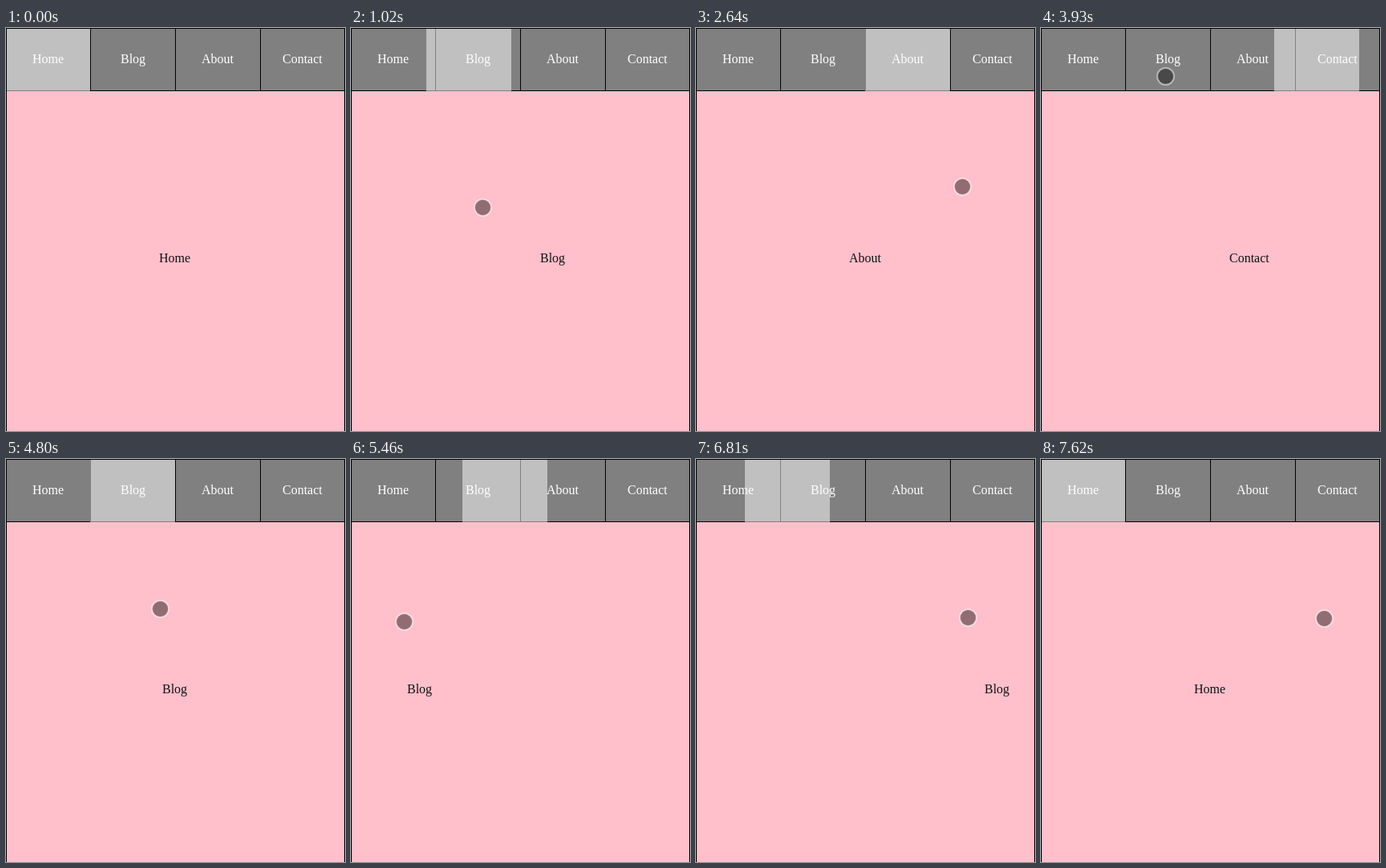
Recreate the animation shown at these times as an HTML page with a canvas. Size 423 px wide and 504 px high, loop 7.65 s.

```html
<!DOCTYPE html>
<html lang="en">
<head>
<meta charset="utf-8">
<title>Swipeable tabs</title>
<style>
  html, body { margin: 0; width: 423px; height: 504px; overflow: hidden; }
  canvas { display: block; }
</style>
</head>
<body>
<canvas id="stage" width="423" height="504"></canvas>
<script>
const ctx = document.getElementById('stage').getContext('2d');
const W = 423, H = 504, LOOP = 7650, STEP = 30;
const TABS = ['Home', 'Blog', 'About', 'Contact'];
const TAB_PITCH = 106, PAGE = 395, SETTLE = 315;

// Moments of the touch story, in ms
const ENTER = 150, SWIPES = [660, 1590, 2640], STROKE = 210, RETURN = 510;
const LEAVE = 3180, TAP = 3893, HOLD = 4800, LET_GO = 5780;
const BACK_START = 6420, BACK_END = 6920;

const DRAGS = [
  ...SWIPES.map((start, i) => ({ start, release: start + STROKE, to: i + 1 })),
  { start: HOLD, release: LET_GO, to: 1 },
  { start: BACK_START, release: BACK_END, to: 0 }
];

const lerp = (a, b, k) => a + (b - a) * k;
const clamp = k => Math.max(0, Math.min(1, k));
const smooth = k => k * k * (3 - 2 * k);
const progress = (t, start, duration) => smooth(clamp((t - start) / duration));
const bezier = (a, b, s) => 3 * a * s * (1 - s) ** 2 + 3 * b * s * s * (1 - s) + s ** 3;

// cubic-bezier(.25, .1, .25, 1)
function ease(x) {
  if (x <= 0 || x >= 1) return clamp(x);
  let lo = 0, hi = 1;
  for (let i = 0; i < 24; i++) {
    const mid = (lo + hi) / 2;
    if (bezier(.25, .25, mid) < x) lo = mid; else hi = mid;
  }
  return bezier(.1, 1, lo);
}

function pointerAt(t) {
  const n = Math.max(0, SWIPES.filter(start => start <= t).length - 1);
  const start = SWIPES[n];
  const away = 1 - progress(t, ENTER, 180);
  const stroke = progress(t, start, STROKE) - progress(t, start + STROKE, RETURN);
  const rise = n + progress(t, start, STROKE + RETURN);
  let x = 332 + 78 * away - 212 * stroke;
  let y = 232 - 138 * away - 17 * rise;

  const glide = (toX, toY, from, until) => {
    const k = progress(t, from, until - from);
    x = lerp(x, toX, k);
    y = lerp(y, toY, k);
  };
  glide(155, 60, LEAVE, 3540);
  glide(192, 187, 3930, 4410);

  // Swing the held page left and right
  const held = clamp((t - HOLD) / (LET_GO - HOLD));
  x -= 165 * Math.sin(held * (LET_GO - HOLD) / 580 * Math.PI * 2);
  y += 24 * held;

  glide(174, 191, LET_GO, 6270);
  glide(362, 199, BACK_START, BACK_END);
  glide(353, 199, BACK_END, LOOP);
  return { x, y };
}

const tapProgress = t => ease((t - TAP) / SETTLE);
const isTapped = t => t >= TAP && t < HOLD;

function positionAt(t) {
  if (isTapped(t)) return lerp(3, 1, tapProgress(t));
  let position = 0;
  for (const { start, release, to } of DRAGS) {
    if (t < start) break;
    if (start === HOLD) position = 1;
    const dragged = pointerAt(Math.min(t, release)).x - pointerAt(start).x;
    position = lerp(position - dragged / PAGE, to, ease((t - release) / SETTLE));
  }
  return position;
}

function rect(x, y, w, h, color) {
  ctx.fillStyle = color;
  ctx.fillRect(x, y, w, h);
}

function label(text, center, y, color) {
  ctx.fillStyle = color;
  ctx.fillText(text, Math.round(center - ctx.measureText(text).width / 2), y);
}

function drawBase() {
  rect(0, 0, W, H, 'black');
  rect(1, 79, W - 2, H - 79, 'pink');
  rect(1, 1, W - 2, 77, 'gray');
  for (let i = 1; i < TABS.length; i++) rect(i * TAB_PITCH - 1, 1, 1, 77, 'black');
}

function drawIndicator(position) {
  const left = Math.round(position * TAB_PITCH) - 1;
  const x = Math.max(1, left), right = Math.min(W - 1, left + TAB_PITCH);
  rect(x, 1, right - x, 78, 'rgba(255,255,255,.5)');
}

function drawPages(t, position) {
  const page = (i, shift) => label(TABS[i], 211 + shift * PAGE, 293, '#111');
  if (isTapped(t)) {
    const k = tapProgress(t);
    page(3, k);
    page(1, k - 1);
  } else {
    TABS.forEach((_, i) => page(i, i - position));
  }
}

function circle(x, y, radius) {
  ctx.beginPath();
  ctx.arc(Math.round(x) + .5, Math.round(y) + .5, radius, 0, Math.PI * 2);
}

function drawPointer({ x, y }) {
  circle(x, y, 10);
  ctx.fillStyle = 'rgba(0,0,0,.43)';
  ctx.fill();
  circle(x, y, 10.5);
  ctx.lineWidth = 2;
  ctx.strokeStyle = 'rgba(255,255,255,.45)';
  ctx.stroke();
}

function draw(t) {
  const position = positionAt(t);
  ctx.font = '16px "Liberation Serif", "Times New Roman", serif';
  drawBase();
  drawIndicator(position);
  TABS.forEach((name, i) => label(name, 52.3 + i * 105.9, 44, 'white'));
  drawPages(t, position);
  if (t >= ENTER) drawPointer(pointerAt(t));
}

const origin = performance.now();
function tick() {
  const t = (performance.now() - origin) % LOOP;
  draw(Math.floor(t / STEP) * STEP);
  requestAnimationFrame(tick);
}
tick();
</script>
</body>
</html>
```
